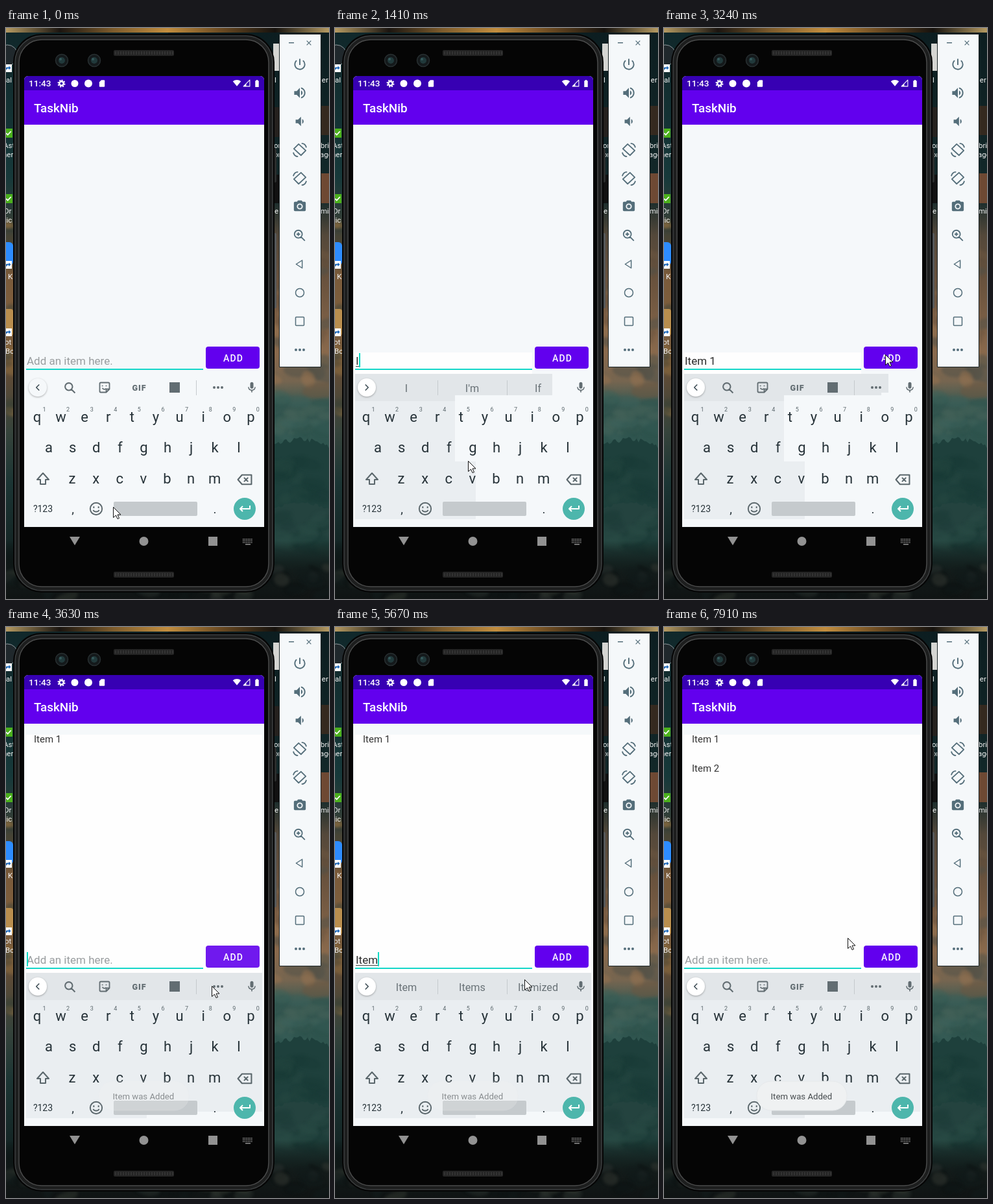
Recreate the animation shown at these times as an HTML page with a canvas. Size 498 px wide and 880 px high, loop 8 s.

```html
<!DOCTYPE html>
<html>
<head>
<meta charset="utf-8">
<style>
html, body { margin: 0; width: 100%; height: 100%; overflow: hidden; background: #000; }
canvas { display: block; }
</style>
</head>
<body>
<canvas id="stage" width="498" height="880"></canvas>
<script>
const W = 498, H = 880, LOOP = 8000;
const FONT = 'Roboto, sans-serif';
const stage = document.getElementById('stage').getContext('2d');
let g;

// ---- drawing helpers ----
function rect(x, y, x2, y2, color) {
  g.fillStyle = color;
  g.fillRect(x, y, x2 - x, y2 - y);
}
function round(x, y, x2, y2, r, fill, stroke, width = 1) {
  g.beginPath();
  g.roundRect(x, y, x2 - x, y2 - y, r);
  if (fill) { g.fillStyle = fill; g.fill(); }
  if (stroke) { g.strokeStyle = stroke; g.lineWidth = width; g.stroke(); }
}
function disc(x, y, r, fill, stroke, width) {
  round(x - r, y - r, x + r, y + r, r, fill, stroke, width);
}
function text(str, x, y, size, color, { align = 'left', weight = 400, spacing = 0 } = {}) {
  g.font = `${weight} ${size}px ${FONT}`;
  g.textAlign = align;
  g.letterSpacing = spacing + 'px';
  g.fillStyle = color;
  g.fillText(str, x, y);
}
const center = { align: 'center' };

// Draws a 24-unit icon centred on (x, y); a line width makes it an outline.
function icon(path, x, y, size, color, line = 0, mirror = 1) {
  g.save();
  g.translate(x, y);
  g.scale(mirror * size / 24, size / 24);
  g.translate(-12, -12);
  const shape = new Path2D(path);
  if (line) {
    g.strokeStyle = color;
    g.lineWidth = line;
    g.lineJoin = 'round';
    g.stroke(shape);
  } else {
    g.fillStyle = color;
    g.fill(shape, 'evenodd');
  }
  g.restore();
}
function dots(x, y, color) {
  for (const dx of [-6, 0, 6]) disc(x + dx, y, 2, color);
}

const ICON = {
  power: 'M13 3h-2v10h2zM17.83 5.17l-1.42 1.42A6.92 6.92 0 0 1 19 12a7 7 0 1 1-11.42-5.41L6.17 5.17A9 9 0 1 0 21 12a8.94 8.94 0 0 0-3.17-6.83z',
  louder: 'M3 9v6h4l5 5V4L7 9zM16.5 12A4.5 4.5 0 0 0 14 8v8a4.5 4.5 0 0 0 2.5-4zM14 3.2v2.1a7 7 0 0 1 0 13.4v2.1a9 9 0 0 0 0-17.6z',
  quieter: 'M18.5 12A4.5 4.5 0 0 0 16 8v8a4.5 4.5 0 0 0 2.5-4zM5 9v6h4l5 5V4L9 9z',
  rotate: 'M10 2 22 13 14 21 2 10zM15 1c4 0 7 3 8 7M9 23c-4 0-7-3-8-7',
  camera: 'M9 2 7.2 4H4a2 2 0 0 0-2 2v12a2 2 0 0 0 2 2h16a2 2 0 0 0 2-2V6a2 2 0 0 0-2-2h-3.2L15 2zM12 17a5 5 0 1 1 0-10 5 5 0 0 1 0 10zM12 15a3 3 0 1 0 0-6 3 3 0 0 0 0 6z',
  search: 'M16 9.5a6.5 6.5 0 1 1-13 0 6.5 6.5 0 0 1 13 0zM14 14l6.5 6.5',
  plus: 'M9.5 6.5v6M6.5 9.5h6',
  back: 'M19 3v18L5 12z',
  wifi: 'M12 21.5.5 8a17 17 0 0 1 23 0z',
  signal: 'M3 21h18V3z',
  battery: 'M16 4h-2V2h-4v2H7v18h10V4z',
  card: 'M18 2h-8L4 8v12a2 2 0 0 0 2 2h12a2 2 0 0 0 2-2V4a2 2 0 0 0-2-2z',
  sticker: 'M3 5a2 2 0 0 1 2-2h14a2 2 0 0 1 2 2v10l-6 6H5a2 2 0 0 1-2-2zM15 21v-6h6M8 8v2M15 8v2M8 13c1 3 5 3 7 1',
  mic: 'M12 14a3 3 0 0 0 3-3V5a3 3 0 0 0-6 0v6a3 3 0 0 0 3 3zM17.3 11a5.3 5.3 0 0 1-10.6 0H5a7 7 0 0 0 6 6.9V21h2v-3.1a7 7 0 0 0 6-6.9z',
  shift: 'M12 3 3 13h5v7h8v-7h5z',
  erase: 'M8 5h14v14H8L2 12zM11 9l6 6M17 9l-6 6',
  enter: 'M20 7v5H5M9 8l-4 4 4 4',
  smile: 'M22 12a10 10 0 1 1-20 0 10 10 0 0 1 20 0zM8 8v3M16 8v3M7 14c2 4 8 4 10 0',
  left: 'M15 6 9 12l6 6',
  right: 'M9 6l6 6-6 6',
  shortcut: 'M5 19V13Q5 9 10 9h5V5l6 6-6 6v-4h-5z'
};

// ---- desktop behind the phone ----
let seed = 7;
function rand() {
  seed = (seed * 16807) % 2147483647;
  return seed / 2147483647;
}
function column(x, x2, stops) {
  const fill = g.createLinearGradient(0, 0, 0, H);
  stops.forEach(([y, color]) => fill.addColorStop(y / H, color));
  rect(x, 0, x2, H, fill);
}
// Soft painted patches, lying roughly flat.
function patches(count, x, x2, y, y2, colors, size) {
  g.save();
  g.filter = 'blur(2px)';
  g.globalAlpha = .5;
  for (let i = 0; i < count; i++) {
    g.fillStyle = colors[i % colors.length];
    g.beginPath();
    g.ellipse(x + rand() * (x2 - x), y + rand() * (y2 - y),
      size * (.5 + rand()), size * (.3 + rand() * .4), rand() - .5, 0, 7);
    g.fill();
  }
  g.restore();
}
function hills(y, color, rough) {
  g.fillStyle = color;
  g.beginPath();
  g.moveTo(405, H);
  for (let x = 405; x <= W + 3; x += 3) g.lineTo(x, y - 12 * Math.sin((x - 410) / 28) - rand() * rough);
  g.lineTo(W + 3, H);
  g.fill();
}
function desktop() {
  column(0, 250, [[0, '#10272a'], [230, '#17393a'], [310, '#3a4138'], [380, '#7a5b3b'],
    [470, '#80603e'], [540, '#5d4b37'], [620, '#37443c'], [700, '#1c3534'], [880, '#0e1818']]);
  column(250, W, [[0, '#0c1d20'], [260, '#13292a'], [320, '#54483a'], [400, '#6c543e'],
    [500, '#89694c'], [545, '#756550'], [580, '#395952'], [650, '#2d544e'], [880, '#1b3432']]);
  patches(30, 410, W, 320, 560, ['#9a7551', '#4e5148', '#6d5640'], 20);
  patches(24, 410, W, 565, 630, ['#3b615a', '#2c524c', '#456259'], 18);
  hills(650, '#1e403c', 8);
  patches(20, 410, W, 670, 730, ['#23453f', '#193a37'], 16);
  hills(745, '#24433f', 5);
  patches(20, 410, W, 750, 810, ['#1d3c39', '#294a45'], 18);
  column(0, W, [[0, 'transparent'], [790, 'transparent'], [840, '#131b1a'], [880, '#0f1313']]);
  patches(60, 0, W, 830, 880, ['#0c1212', '#2b322f', '#333831', '#111b1b'], 14);
  patches(20, 0, 14, 300, 640, ['#94703f', '#3c4439', '#4a4333'], 12);

  const trim = g.createLinearGradient(0, 0, W, 0);
  ['#b59a62', '#1b1510', '#7e5c2c', '#c28d3e', '#6b4a22', '#15110d', '#b59a62']
    .forEach((color, i) => trim.addColorStop(i / 6, color));
  rect(0, 0, W, 7, trim);
  disc(2, 42, 16, '#20282c', '#8d979b');
  round(-20, 330, 11, 366, 6, '#2d8cff');
  round(-10, 433, 11, 474, 4, '#b98e4e');
  rect(412, 24, 421, 66, '#d5d5d2');
  rect(412, 122, 421, 168, '#25211e');
  rect(412, 226, 421, 270, '#111');
  rect(486, 120, W, 165, '#34291f');
  rect(486, 224, W, 270, '#6e4933');
  for (const y of [62, 365, 469]) {
    rect(-2, y - 6, 9, y + 6, '#fff');
    icon(ICON.shortcut, 3, y, 12, '#1763b6');
  }
  for (const y of [162, 263]) {
    rect(-2, y - 7, 10, y + 7, '#4bb01c');
    icon('M4 12l5 6L20 6', 4, y, 11, '#fff', 4);
  }
  const labels = [[0, 84, 'al'], [-4, 185, 'Ast'], [-5, 199, 'ner'], [-3, 286, 'Dr'], [-5, 300, 'vic'],
    [3, 387, 'K'], [-2, 488, 'ot'], [-1, 502, 'Bo'], [414, 84, 'l'], [413, 185, 'or'], [413, 199, 'on'],
    [414, 286, 'e'], [484, 84, 'ler'], [485, 185, 'bri'], [484, 199, 'ago'], [485, 286, 'mi']];
  for (const [x, y, str] of labels) text(str, x, y, 11.5, '#f2f2f2');
}

// ---- emulator side panel ----
function panel() {
  const ink = '#546e7a', x = 453;
  round(421.5, 9.5, 485.5, 522.5, 0, '#f5f8fa', '#1b2426');
  rect(436, 22, 444, 23.5, ink);
  icon('M4 4 20 20M20 4 4 20', 467, 23, 10, ink, 3);
  icon(ICON.power, x, 56, 23, ink);
  icon(ICON.louder, x, 100, 23, ink);
  icon(ICON.quieter, x, 144, 22, ink);
  icon(ICON.rotate, x, 188, 22, ink, 2);
  icon(ICON.rotate, x, 232, 22, ink, 2, -1);
  icon(ICON.camera, x, 275, 22, ink);
  icon(ICON.search + ICON.plus, x, 320, 22, ink, 2);
  icon(ICON.back, x - 1, 364, 16, ink, 2.2);
  disc(x, 408, 6.5, null, ink, 1.5);
  round(446.5, 445.5, 459.5, 458.5, 1, null, ink, 1.5);
  dots(x, 496, ink);
}

// ---- phone, without anything that changes ----
function phone() {
  round(412, 186, 417, 238, 2, '#2b2d2d');
  round(412, 316, 417, 432, 2, '#55585a');
  round(11, 9, 414, 870, 44, '#050505');
  round(14, 12, 411, 867, 41, '#1d1e1e', '#3c3f40', 1.5);
  round(20, 18, 405, 861, 35, '#050505', '#4a4b4b', 1.5);
  for (const y of [34, 838]) {
    round(166, y, 259, y + 9, 2, '#242424');
    for (let x = 168; x < 258; x += 4) rect(x, y + 2, x + 2, y + 7, '#333');
  }
  for (const x of [86, 136]) {
    disc(x, 50, 9.5, '#14191b', '#282f31', 1.5);
    disc(x, 50, 5, '#21393b');
    disc(x - 2, 48, 2, '#35595a');
  }
  round(28, 74, 398, 769, [6, 6, 0, 0], '#f5f8fa');
  round(28, 74, 398, 97, [6, 6, 0, 0], '#3700b3');
  rect(28, 96, 398, 149, '#6200ee');
  text('11:43', 35, 90, 13.6, '#fff', { weight: 500 });
  disc(85.5, 85.5, 3.2, null, '#fff', 2.4);
  g.setLineDash([2, 1.9]);
  disc(85.5, 85.5, 5, null, '#fff', 2);
  g.setLineDash([]);
  disc(106, 85.5, 5.5, '#fff');
  disc(127, 85.5, 6, '#fff');
  icon(ICON.card, 148, 85.5, 12.5, '#fff');
  icon(ICON.wifi, 356, 84.5, 13, '#fff');
  icon(ICON.signal, 371, 85, 13, '#fff', 2);
  icon('M3 21h8v-8z', 371, 85, 13, '#fff');
  icon(ICON.battery, 387, 85.5, 13, '#fff');
  text('TaskNib', 43, 130, 18.9, '#fff', { weight: 500 });

  const nav = '#929292';
  icon('M0 3h24L12 23z', 106, 790, 16, nav);
  disc(212.5, 791, 7, nav);
  rect(312, 784, 326, 798, nav);
  for (let row = 0; row < 3; row++)
    for (let col = 0; col < 6; col++) rect(365 + col * 2.6, 787 + row * 2.6, 366.5 + col * 2.6, 788.5 + row * 2.6, nav);
  rect(369, 795, 377, 796.5, nav);
}

function keyboard() {
  const ink = '#263238', soft = '#5b676c', pitch = 36.6;
  const row = (keys, x, y, size = 22, color = ink) =>
    [...keys].forEach((key, i) => text(key, x + i * pitch, y, size, color, center));
  row('qwertyuiop', 48, 607);
  row('1234567890', 59, 591, 9, soft);
  row('asdfghjkl', 66, 654);
  row('zxcvbnm', 102, 702);
  icon(ICON.shift, 57, 695, 24, soft, 2);
  icon(ICON.erase, 368, 696, 25, soft, 2);
  text('?123', 57, 746, 14, ink, center);
  text(',', 103, 748, 19, ink, center);
  icon(ICON.smile, 139, 741, 22, soft, 2.1);
  round(166, 730, 295, 752, 2, '#c5cacd');
  text('.', 322, 748, 19, ink, center);
  disc(368, 741, 17, '#4db6ac');
  icon(ICON.enter, 368, 741, 24, '#fff', 2);
}

// ---- timeline: [start in ms, value] ----
const typed = [[0, ''], [1410, 'I'], [1690, 'It'], [1840, 'Ite'], [1960, 'Item'], [2230, 'Item '],
  [2510, 'Item 1'], [3390, ''], [5150, 'I'], [5430, 'It'], [5550, 'Ite'], [5670, 'Item'],
  [6220, 'Item '], [6370, 'Item 2'], [7430, '']];
const caretOn = [[0, 0], [460, 1], [1010, 0], [1410, 1], [2940, 0], [3390, 1], [3900, 0], [4450, 1],
  [4880, 0], [5150, 1], [6890, 0], [7430, 1], [7910, 0]];
const pointer = [[0, [165, 738]], [460, [172, 735]], [580, [196, 700]], [700, [205, 667]],
  [2940, [334, 484]], [3090, [339, 482]], [3240, [341, 503]], [3510, [334, 520]], [3630, [317, 553]],
  [3780, [300, 548]], [3900, [292, 543]], [7010, [288, 508]], [7160, [318, 500]], [7280, [339, 496]],
  [7670, [325, 490]], [7790, [298, 482]], [7910, [283, 479]]];
const toastAlpha = [[0, 0], [3510, .25], [3630, .6], [3780, 1], [5550, .85], [5670, .6], [5820, .3],
  [5970, 0], [7550, .25], [7670, .6], [7790, 1]];
const pressed = [[0, 0], [3390, 1], [3780, 0], [7430, 1], [7670, 0]];
const words = {
  'I': ['I', "I'm", 'If'],
  'It': ['It', "It's", 'Its'],
  'Ite': ['Ite', 'Item', 'Items'],
  'Item': ['Item', 'Items', 'Itemized'],
  'Item ': ['is', 'number', 'of']
};
const BAND = '#e2e6e9', KEYS = '#eaeef1', WHITE = '#fefefe';
const repaints = [
  [460, 31, 500, 304, 533, WHITE], [460, 31, 533, 185, 757, KEYS], [460, 31, 533, 185, 575, BAND],
  [580, 185, 668, 217, 757, KEYS], [1410, 185, 533, 335, 566, BAND], [1840, 335, 533, 346, 562, BAND],
  [3390, 31, 166, 395, 533, WHITE], [3390, 31, 533, 395, 747, KEYS], [3390, 31, 533, 395, 575, BAND]];

const at = (track, t) => track.findLast(([start]) => start <= t)[1];

function inputRow(t, value) {
  const field = value || 'Add an item here.';
  const underlined = value && !value.includes(' ');
  text(field, 32, 519, 17, value ? '#2b2b2b' : '#999d9f');
  const end = 32 + (value ? Math.round(g.measureText(value).width) : 0);
  if (underlined) rect(32, 521, end, 522, '#444');
  if (at(caretOn, t)) rect(end, 501, end + 2, 523, '#03dac5');
  rect(31, 525, 304, 527, '#14d6c8');
  round(308, 491, 391, 525, 4, at(pressed, t) ? '#7019ee' : '#6200ee');
  text('ADD', 350.5, 514, 14, '#fff', { align: 'center', weight: 500, spacing: 1.2 });
}

function toolbar(t, value) {
  const soft = '#626d72';
  let hints = words[value];
  if (t >= 6370 && t < 6520) hints = ['', '', ''];
  g.save();
  g.shadowColor = 'rgba(0,0,0,.3)';
  g.shadowBlur = 3;
  g.shadowOffsetY = 1;
  disc(49, 554, 14, t < 460 ? '#f5f8fa' : '#fff');
  g.restore();
  icon(hints ? ICON.right : ICON.left, 49, 554, 18, '#37474f', 2);
  icon(ICON.mic, 379, 554, 20, soft);
  if (hints) {
    hints.forEach((word, i) => text(word, 110 + i * 101.5, 561, 16.2, '#697277', center));
    for (const x of [158, 265]) rect(x, 543, x + 1, 566, '#c5cacd');
    return;
  }
  icon(ICON.search, 99, 555, 21, soft, 2.4);
  icon(ICON.sticker, 152, 554, 20, soft, 2.2);
  text('GIF', 205.5, 559, 12.5, soft, { align: 'center', weight: 900, spacing: 1 });
  rect(252, 546, 268, 562, soft);
  rect(293, 543, 294, 566, '#c5cacd');
  dots(327, 554, soft);
}

function toast(alpha) {
  g.globalAlpha = alpha ** 3;
  round(143, 700, 282, 745, 22, '#eff1f2', '#e6e9eb');
  g.globalAlpha = alpha;
  text('Item was Added', 164.5, 728, 13.2, '#484d50');
  g.globalAlpha = 1;
}

function arrow([x, y]) {
  g.save();
  g.translate(x + .5, y + .5);
  const shape = new Path2D('M0 0V16L4 12.5 6.5 18 9 17 6.5 11.5H11.5Z');
  g.fillStyle = '#fff';
  g.fill(shape);
  g.strokeStyle = '#111';
  g.lineWidth = 1;
  g.stroke(shape);
  g.restore();
}

function draw(t) {
  const value = at(typed, t);
  g = stage;
  g.drawImage(backdrop, 0, 0);
  for (const [start, ...box] of repaints) if (t >= start) rect(...box);
  if (t >= 3390) text('Item 1', 43, 178, 15, '#333');
  if (t >= 7430) text('Item 2', 43, 223, 15, '#333');
  inputRow(t, value);
  toolbar(t, value);
  keyboard();
  toast(at(toastAlpha, t));
  arrow(at(pointer, t));
}

const backdrop = document.createElement('canvas');
backdrop.width = W;
backdrop.height = H;
g = backdrop.getContext('2d');
desktop();
panel();
phone();

const begin = performance.now();
function tick() {
  draw((performance.now() - begin) % LOOP);
  requestAnimationFrame(tick);
}
tick();
</script>
</body>
</html>
```
